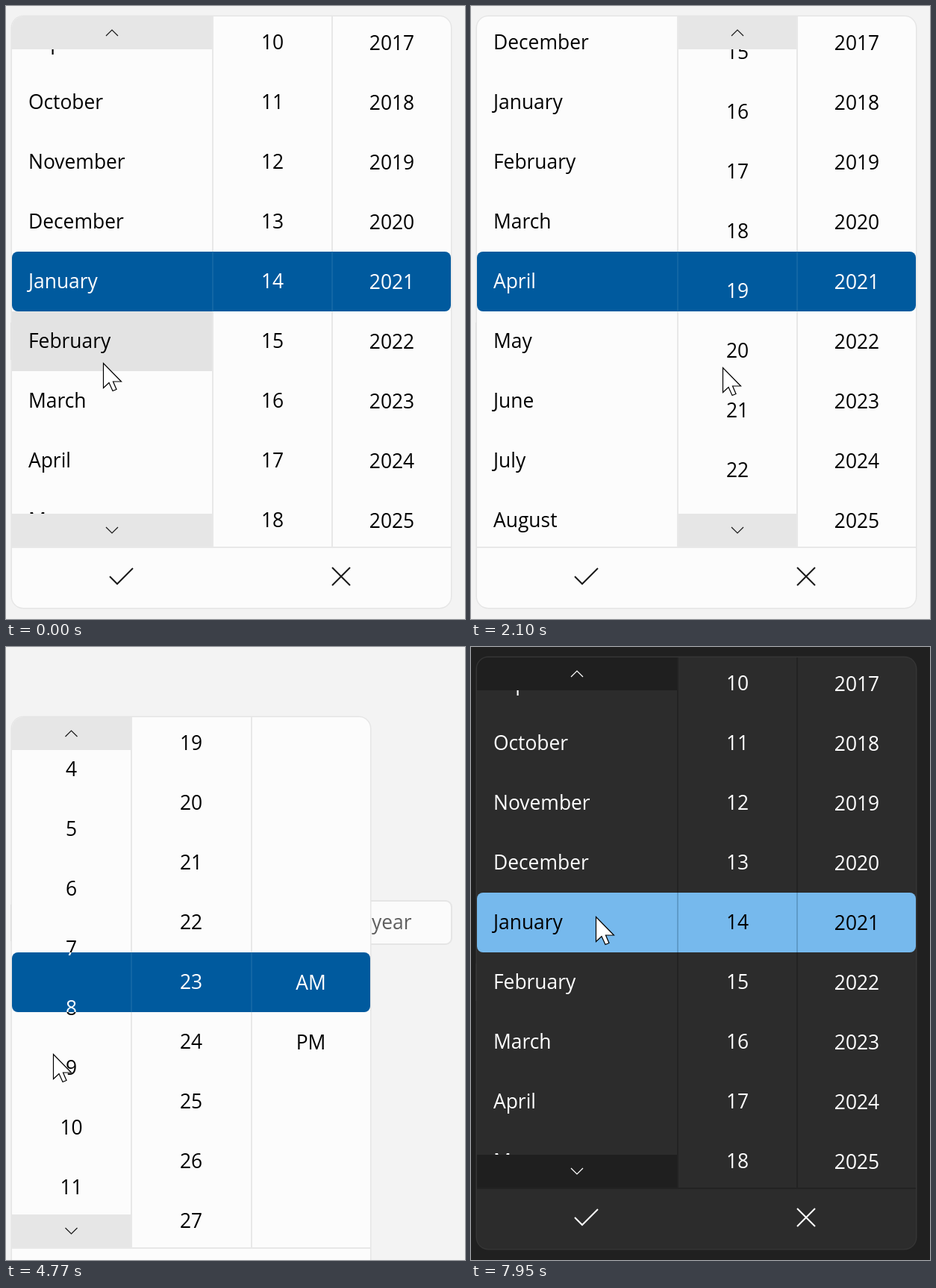
Animation, 615 px wide and 821 px high, one loop 8000 ms. Source, as an HTML page with a canvas:

```html
<!DOCTYPE html>
<html lang="en">
<head>
<meta charset="utf-8">
<title>Date and time pickers</title>
<style>
  html, body { margin: 0; width: 100%; height: 100%; overflow: hidden; background: #f3f3f3; }
  canvas { display: block; width: 615px; height: 821px; }
</style>
</head>
<body>
<canvas id="stage" width="615" height="821"></canvas>
<script>
const ctx = document.getElementById('stage').getContext('2d');
const LOOP = 8000, TIME_OPENS = 2550, DARK_STARTS = 7950;
const ROW = 80;

const MONTHS = ['January', 'February', 'March', 'April', 'May', 'June', 'July',
  'August', 'September', 'October', 'November', 'December'];

const LIGHT = {
  page: '#f3f3f3', panel: '#fcfcfc', edge: '#e5e5e5', line: '#e8e8e8', button: '#e6e6e6',
  hover: '#e3e3e3', bar: '#005a9e', barLine: '#1266a5', text: '#000', barText: '#fff',
  icon: '#1a1a1a', rim: '#dadada'
};
const DARK = {
  page: '#202020', panel: '#2c2c2c', edge: '#353535', line: '#232323', button: '#1f1f1f',
  hover: '#383838', bar: '#76b9ed', barLine: '#5e9bc9', text: '#fff', barText: '#000',
  icon: '#fff', rim: '#303030'
};

// Easing
const linear = p => p;
const smooth = p => p * p * (3 - 2 * p);
const easeIn = p => p * p;
const easeOut = n => p => 1 - (1 - p) ** n;
const easeInOut = n => p => p < .5 ? .5 * (2 * p) ** n : 1 - .5 * (2 - 2 * p) ** n;

// Keys are [time, value, easing towards this key]
function track(keys, t) {
  let prev = keys[0];
  for (const key of keys) {
    if (t < key[0]) {
      const p = (key[2] || linear)(Math.max(0, (t - prev[0]) / (key[0] - prev[0])));
      return prev[1] + (key[1] - prev[1]) * p;
    }
    prev = key;
  }
  return prev[1];
}

const monthKeys = [[20, 0], [810, 8, easeInOut(2)], [840, 8], [1230, 10.29, easeIn], [1560, 15, easeOut(2)]];
const dayKeys = [[1650, 14], [2390, 19, easeOut(3.67)]];
const hourKeys = [[4170, 11], [4970, 20, easeInOut(3.32)]];
const minuteKeys = [[2910, 15], [3370, 17.34, easeIn], [3700, 23, easeOut(2)],
  [5300, 23], [5970, 32, easeInOut(2.5)]];
const halfKeys = [[6700, 0], [7200, 1, easeOut(3)]];

// Pointer path: time, x, y
const path = [
  [840, 130, 478], [1230, 150, 523], [1620, 334, 490], [1700, 337, 484],
  [2550, 337, 484], [2551, 231, 505], [3730, 231, 505], [4020, 63, 545],
  [4770, 63, 545], [4970, 66, 560], [5000, 66, 560], [5020, 72, 560],
  [5170, 72, 560], [5350, 232, 548], [5990, 232, 548], [6410, 437, 585],
  [7410, 437, 585], [7790, 525, 480]
];
const pathX = path.map(([t, x]) => [t, x, smooth]);
const pathY = path.map(([t, , y]) => [t, y, smooth]);

const wrap = (n, size) => ((n % size) + size) % size;
const month = i => MONTHS[wrap(i, 12)];
const day = i => String(wrap(i - 1, 31) + 1);
const hour = i => String(wrap(i - 1, 12) + 1);
const minute = i => String(wrap(i, 60)).padStart(2, '0');
const half = i => ['AM', 'PM'][i] || '';

function datePicker(t, dark) {
  return {
    top: 13, right: 597, edges: [8, 277, 437, 596], rim: [424, 474],
    columns: [
      { label: month, pos: dark ? 0 : track(monthKeys, t), x: 30, align: 'left', hover: !dark && t < 840 ? 1 : null },
      { label: day, pos: dark ? 14 : track(dayKeys, t), x: 357 },
      { label: String, pos: 2021, x: 517, drop: 1 }
    ]
  };
}

function timePicker(t) {
  return {
    top: 93, right: 489, edges: [8, 168, 329, 488], rim: [345, 394],
    columns: [
      { label: hour, pos: track(hourKeys, t), x: 87.5 },
      { label: minute, pos: track(minuteKeys, t), x: 248, hover: t < 3715 ? 16 : null },
      { label: half, pos: track(halfKeys, t), x: 408.5, drop: 1 }
    ]
  };
}

function rect(x0, y0, x1, y1, fill) {
  ctx.fillStyle = fill;
  ctx.fillRect(x0, y0, x1 - x0, y1 - y0);
}

function roundPath(x0, y0, x1, y1, r) {
  ctx.beginPath();
  ctx.roundRect(x0, y0, x1 - x0, y1 - y0, r);
}

function stroke(color, width, ...lines) {
  ctx.strokeStyle = color;
  ctx.lineWidth = width;
  ctx.beginPath();
  for (const line of lines) line.forEach(([x, y], i) => i ? ctx.lineTo(x, y) : ctx.moveTo(x, y));
  ctx.stroke();
}

function drawLabels(picker, color) {
  ctx.fillStyle = color;
  const mid = picker.top + 356;
  for (const { label, pos, x, align = 'center', drop = 0 } of picker.columns) {
    ctx.textAlign = align;
    const base = Math.round(pos);
    for (let i = base - 6; i <= base + 6; i++) {
      ctx.fillText(label(i), x, Math.round(mid + (i - pos) * ROW) + 9 + drop);
    }
  }
}

function drawButtons(x0, x1, top, look) {
  const x = (x0 + x1) / 2, up = top + 23, down = top + 689;
  rect(x0, top + 1, x1, top + 45, look.button);
  rect(x0, top + 667, x1, top + 711, look.button);
  stroke(look.icon, 1.2,
    [[x - 8, up + 4], [x, up - 4], [x + 8, up + 4]],
    [[x - 8, down - 4], [x, down + 4], [x + 8, down - 4]]);
}

function drawField(look) {
  roundPath(8, 340, 597, 398, 8);
  ctx.fillStyle = '#fbfbfb';
  ctx.fill();
  ctx.strokeStyle = look.edge;
  ctx.lineWidth = 2;
  ctx.stroke();
  ctx.fillStyle = '#5f5f5f';
  ctx.textAlign = 'left';
  ctx.fillText('year', 490, 378);
}

function drawPicker(picker, pointerX, look) {
  const { top, right, edges, columns, rim } = picker;
  const bottom = top + 794, mid = top + 356;
  const barTop = mid - ROW / 2, barBottom = mid + ROW / 2;
  const dividers = edges.slice(1, 3);

  rect(6, rim[0], 7, rim[1], look.rim);
  roundPath(6.5, top - .5, right + .5, bottom + .5, 17);
  ctx.fillStyle = look.edge;
  ctx.fill();

  ctx.save();
  roundPath(8, top + 1, right - 1, bottom - 1, 15);
  ctx.clip();
  rect(0, top, right, bottom, look.panel);

  ctx.save();
  ctx.beginPath();
  ctx.rect(0, top + 1, right, 710);
  ctx.clip();
  columns.forEach(({ hover, pos }, c) => {
    if (hover == null) return;
    const y = Math.round(mid + (hover - pos) * ROW);
    rect(edges[c], y - 40, edges[c + 1] - 1, y + 40, look.hover);
  });
  drawLabels(picker, look.text);
  ctx.restore();

  for (const x of dividers) rect(x - 1, top + 1, x + 1, top + 711, look.line);
  rect(8, top + 711, right, top + 713, look.line);

  columns.forEach((_, c) => {
    if (pointerX < edges[c] || pointerX >= edges[c + 1]) return;
    drawButtons(edges[c] + (c ? 1 : 0), edges[c + 1] - (c < 2 ? 1 : 0), top, look);
  });

  const y = top + 751;
  stroke(look.icon, 2,
    [[139, y], [149, y + 10], [170, y - 11]],
    [[437, y - 12], [461, y + 12]], [[461, y - 12], [437, y + 12]]);
  ctx.restore();

  ctx.save();
  roundPath(8, barTop, right - 1, barBottom, 8);
  ctx.clip();
  rect(8, barTop, right, barBottom, look.bar);
  for (const x of dividers) rect(x - 1, barTop, x + 1, barBottom, look.barLine);
  drawLabels(picker, look.barText);
  ctx.restore();
}

function drawPointer(x, y) {
  const shape = [[0, 0], [0, 33], [7.5, 26], [12.5, 37], [17.5, 35], [13, 24.5], [24, 24.5]];
  ctx.beginPath();
  for (const [dx, dy] of shape) ctx.lineTo(x + dx + .5, y + dy + .5);
  ctx.closePath();
  ctx.fillStyle = '#fff';
  ctx.fill();
  ctx.strokeStyle = '#000';
  ctx.lineWidth = 1.2;
  ctx.stroke();
}

function draw(t) {
  const dark = t >= DARK_STARTS;
  const look = dark ? DARK : LIGHT;
  const showTime = t >= TIME_OPENS && !dark;
  const x = dark ? 167 : Math.round(track(pathX, t));
  const y = dark ? 361 : Math.round(track(pathY, t));

  ctx.font = '26.4px "Open Sans", "Noto Sans", sans-serif';
  rect(0, 0, 615, 821, look.page);
  if (showTime) drawField(look);
  drawPicker(showTime ? timePicker(t) : datePicker(t, dark), x, look);
  drawPointer(x, y);
}

const start = performance.now();
function tick() {
  draw((performance.now() - start) % LOOP);
  requestAnimationFrame(tick);
}
tick();
</script>
</body>
</html>
```
